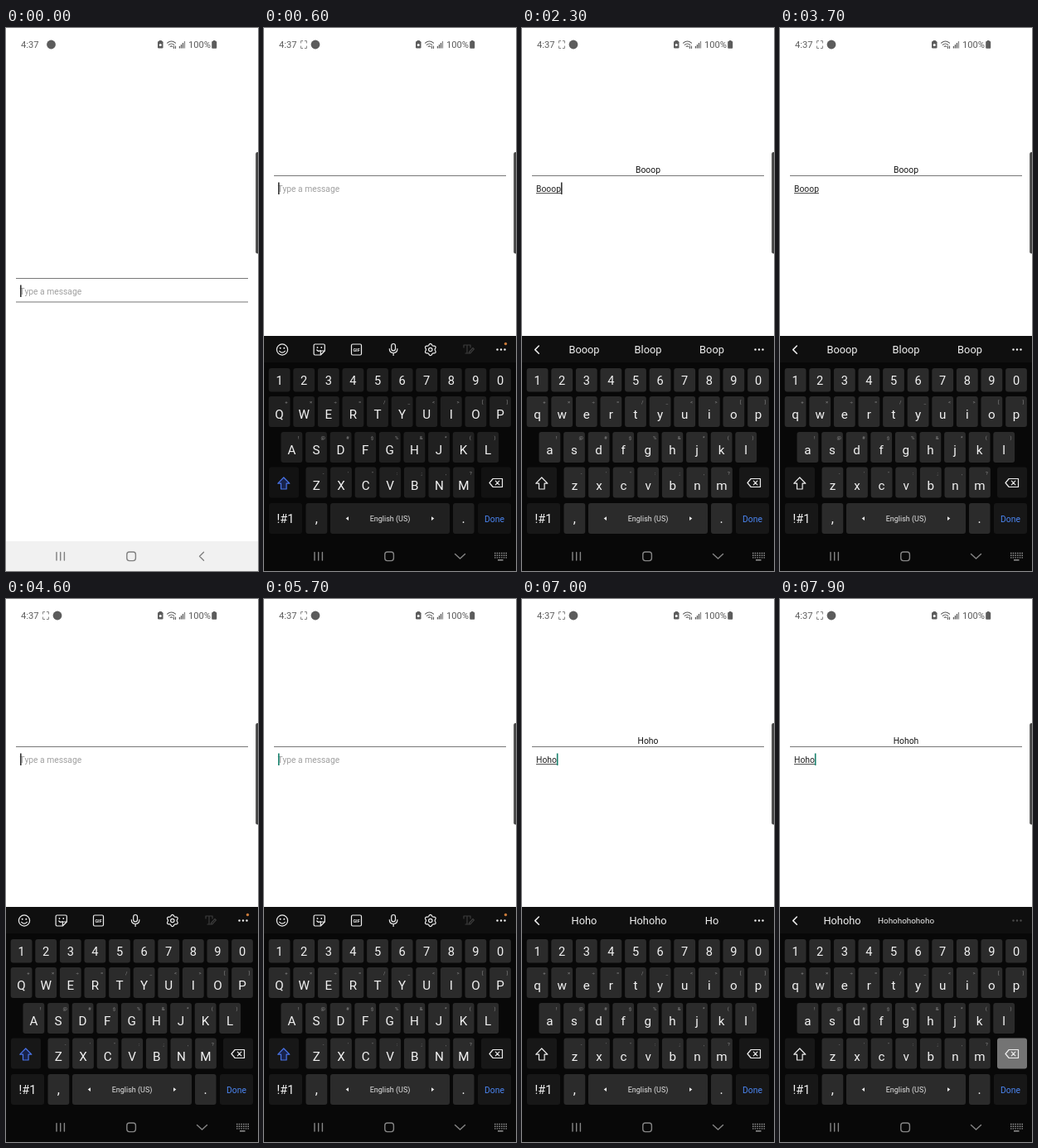
Recreate the animation shown at these times as an HTML page. Size 304 by 656 pixels, loop 8 s.

```html
<!DOCTYPE html>
<html lang="en">
<head>
<meta charset="utf-8">
<title>Message input</title>
<style>
html, body { margin: 0; width: 100%; height: 100%; overflow: hidden; background: #fff; }
svg { display: block; width: 100vw; height: 100vh; font-family: Roboto, sans-serif; }
.line { fill: none; stroke: #eee; stroke-width: 1.2; stroke-linecap: round; stroke-linejoin: round; }
.mid { text-anchor: middle; }
</style>
</head>
<body>
<svg id="stage" viewBox="0 0 304 656"></svg>
<script>
const LOOP = 8000;
const SLIDE = [150, 450];
const RESIZE = 250;
const ECHO_LAG = 60, HINT_LAG = 120;

// time, text in the field
const edits = [
  [0, ''], [RESIZE, ''],
  [1200, 'B'], [1500, 'Bo'], [1700, 'Boo'], [1900, 'Booo'], [2150, 'Booop'],
  [4000, 'Booo'], [4220, 'Boo'], [4280, 'Bo'], [4340, 'B'], [4400, ''],
  [5900, 'H'], [6200, 'Ho'], [6600, 'Hoh'], [6850, 'Hoho'], [7100, 'Hohoh'], [7350, 'Hohoho'],
  [7780, 'Hohoh'], [7880, 'Hoho']
];
const hints = {
  B: ['B', 'But', 'By'], Bo: ['Bo', 'Both', 'Boy'], Boo: ['Boo', 'Book', 'Books'],
  Booo: ['Booo', 'Boop', 'Boooo'], Booop: ['Booop', 'Bloop', 'Boop'],
  H: ['H', 'Have', 'How'], Ho: ['Ho', 'How', 'Hope'], Hoh: ['Hoh', 'Hon', 'Ho'],
  Hoho: ['Hoho', 'Hohoho', 'Ho'],
  Hohoh: ['Hohoho', 'Hohohohohoho', ''], Hohoho: ['Hohoho', 'Hohohohohoho', '']
};
const holds = [[3950, 4400], [7730, LOOP]];

const esc = s => s.replace(/&/g, '&amp;').replace(/</g, '&lt;');
const text = (x, y, size, fill, s, more = 'class="mid"') =>
  `<text x="${x}" y="${y}" font-size="${size}" fill="${fill}" ${more}>${esc(s)}</text>`;
const rect = (x, y, w, h, fill, r = 0, more = '') =>
  `<rect x="${x}" y="${y}" width="${w}" height="${h}" rx="${r}" fill="${fill}" ${more}/>`;
const path = (d, more = '') => `<path class="line" d="${d}" ${more}/>`;
const dot = (x, y, r, fill) => `<circle cx="${x}" cy="${y}" r="${r}" fill="${fill}"/>`;
const ring = (x, y, r) => `<circle class="line" cx="${x}" cy="${y}" r="${r}"/>`;
const dots = fill => [281.5, 286, 290.5].map(x => dot(x, 388.5, 1.2, fill)).join('');

function statusBar() {
  const c = '#5c5c5c';
  const bars = [0, 1, 2, 3].map(i =>
    rect(208.8 + i * 2, 22 - i * 2, 1.3, 2.5 + i * 2, i < 3 ? c : '#888')).join('');
  return text(18, 24, 11.2, c, '4:37', '') +
    `<g id="capture">${path('M44.5 18v-2.5h2.2M49.3 15.5h2.2V18M51.5 22v2.5h-2.2M46.7 24.5h-2.2V22', 'style="stroke:#888;stroke-width:1"')}</g>` +
    `<circle id="badge" cy="20" r="5.4" fill="${c}"/>` +
    rect(183, 16, 6.5, 8.5, c, 1.2) + rect(184.6, 15, 3.3, 2, c) + dot(186.25, 20.5, 1.5, '#fff') +
    path('M194.5 18.2q5-4.4 10 0M196.3 20.4q3.2-2.8 6.4 0M198.2 22.4q1.3-1 2.6 0M202.5 22v2.5M204.5 22v2.5', `style="stroke:${c};stroke-width:1.1"`) +
    bars + text(220, 24, 11.2, c, '100%', '') +
    rect(248.2, 16, 6, 8.7, c, 1) + rect(249.8, 15, 2.8, 2, c);
}

const navIcons = (color, back) =>
  `<g style="stroke:${color}">` +
  path('M61 633.5v9.5M65.7 633.5v9.5M70.4 633.5v9.5' + back, 'style="stroke:inherit;stroke-width:1.4"') +
  '<rect class="line" x="145.8" y="633" width="10.6" height="10.6" rx="3" style="stroke:inherit;stroke-width:1.4"/></g>';

const toolbar = () =>
  ring(22, 388.5, 6.6) + dot(19.7, 386.8, 1, '#eee') + dot(24.3, 386.8, 1, '#eee') + path('M18.7 390.3q3.3 3.6 6.6 0') +
  path('M61.5 382h10.4q1.4 0 1.4 1.4v6.6l-5 5h-6.8q-1.4 0-1.4-1.4v-10.2q0-1.4 1.4-1.4M73.3 390h-3.6q-1.4 0-1.4 1.4v3.6M63.8 389q2 2.4 4.4 .6') +
  dot(64.5, 386, .9, '#eee') + dot(69.3, 386, .9, '#eee') +
  '<rect class="line" x="105.5" y="382" width="12" height="13" rx="1.5"/>' + text(111.5, 390.7, 5.4, '#eee', 'GIF', 'class="mid" font-weight="700"') +
  '<rect class="line" x="153.7" y="381.5" width="4.8" height="8.4" rx="2.4"/>' + path('M151.3 387.5q0 5 4.8 5t4.8-5M156.1 392.5v3') +
  gear(200.8, 388.5) +
  `<g opacity=".2">${path('M241 386v-3h8v3M245 383v10M243 393h4M247.5 391.5l4.5-5 1.4 1.4-4.5 5h-1.4z')}</g>` +
  dots('#eee') + dot(291.5, 381.5, 1.7, '#c97a3a');

function gear(x, y) {
  let d = '';
  for (let i = 0; i <= 48; i++) {
    const a = i / 48 * Math.PI * 2, r = 6.2 + .9 * Math.cos(a * 6);
    d += (i ? 'L' : 'M') + (x + r * Math.sin(a)).toFixed(2) + ' ' + (y - r * Math.cos(a)).toFixed(2);
  }
  return path(d + 'z') + ring(x, y, 2.2);
}

function strip(word) {
  if (!word) return toolbar();
  const list = hints[word];
  return path('M20.3 384l-4.6 4.6 4.6 4.6', 'style="stroke-width:1.5"') +
    list.map((s, i) => text(75 + i * 77, s.length > 8 ? 392 : 393, s.length > 8 ? 9.9 : 12.8, '#f0f0f0', s)).join('') +
    dots(list[2] ? '#eee' : '#4a4a4a');
}

const STEP = 29.6, KEY = '#2b2b2b', SIDE = '#171717';
function keyRow(keys, marks, x0, y, h) {
  const letter = h > 30;
  return [...keys].map((k, i) => {
    const x = x0 + i * STEP;
    return rect((x - 12.9).toFixed(1), y, 25.8, h, KEY, 3, `class="key" data-key="${k}"`) +
      text(x.toFixed(1), y + (letter ? 27.2 : 19.8), letter ? 15.2 : 14.6, '#f2f2f2', k, `class="mid ${letter ? 'letter' : ''}"`) +
      (marks ? text((x + 8.3).toFixed(1), y + 9, 6, '#8c8c8c', marks[i]) : '');
  }).join('');
}

const keyboard = () =>
  rect(0, 372, 304, 290, '#080808') + rect(0, 372, 304, 32, '#0f0f0f') +
  '<g id="strip"></g>' +
  keyRow('1234567890', '', 18.6, 411, 28.5) +
  keyRow('qwertyuiop', '+×÷=/_<>[]', 18.6, 445, 37) +
  keyRow('asdfghjkl', '!@#$%&*()', 33.4, 488, 37) +
  keyRow('zxcvbnm', '-\'":;,?', 63.4, 530.5, 37) +
  rect(6, 530.5, 36, 37, SIDE, 3, 'class="key"') +
  path('M23.8 543l-7 7.2h3.7v6.8h6.6v-6.8h3.7z', 'id="shift"') +
  rect(262, 530.5, 36, 37, SIDE, 3, 'class="key" id="erase"') +
  path('M272 549.5l4.2-5h11.3v10h-11.3zM279.3 547.2l4.6 4.6M283.9 547.2l-4.6 4.6') +
  rect(6, 574, 40, 37, SIDE, 3, 'class="key"') + text(26, 598, 14.5, '#f2f2f2', '!#1') +
  rect(50.5, 574, 25.8, 37, KEY, 3, 'class="key"') + text(63.4, 598, 16, '#f2f2f2', ',') +
  rect(80, 574, 144, 37, KEY, 3, 'class="key"') + text(152, 596, 9, '#e4e4e4', 'English (US)') +
  '<path d="M102 590.3v4.6l-3.3-2.3zM202 590.3v4.6l3.3-2.3z" fill="#eee"/>' +
  rect(228, 574, 25.5, 37, KEY, 3, 'class="key"') + text(240.7, 598, 16, '#f2f2f2', '.') +
  rect(258, 574, 40, 37, SIDE, 3, 'class="key"') + text(278, 596.5, 10.4, '#4b86f2', 'Done');

const pad = () => {
  let d = '';
  for (let r = 0; r < 3; r++)
    for (let c = 0; c < 6; c++) d += `M${278 + c * 2.7} ${634.5 + r * 2.7}h1.5`;
  return path(d + 'M282 642.8h6.5', 'style="stroke:#929292;stroke-width:1.4;stroke-linecap:butt"');
};

const stage = document.getElementById('stage');
stage.innerHTML = rect(0, 0, 304, 656, '#fff') + statusBar() +
  '<g id="field">' + rect(12, 178, 280, 1, '#777') + rect(12, 206.5, 280, 1, '#777', 0, 'id="under"') +
  text(16.6, 197.7, 10.3, '#a0a0a0', 'Type a message', 'id="prompt"') +
  text(17, 197.7, 10.35, '#222', '', 'id="typed"') +
  rect(17, 199.2, 0, .9, '#333', 0, 'id="mark"') + rect(17, 186.5, 1.6, 14.5, '#333', 0, 'id="caret"') + '</g>' +
  text(152, 175, 10.35, '#111', '', 'id="echo" class="mid"') +
  rect(301.2, 150, 6, 122.5, '#454545', 2) +
  '<g id="lightNav">' + rect(0, 620, 304, 36, '#f1f1f1') + navIcons('#808080', 'M238.5 633.2l-5 5 5 5') + '</g>' +
  '<g id="board">' + keyboard() + '</g>' +
  '<g id="darkNav">' + rect(0, 620, 304, 36, '#080808') + navIcons('#858585', 'M230.5 635.5l6 5.5 6-5.5') + pad() + '</g>';

const el = {};
stage.querySelectorAll('[id]').forEach(n => el[n.id] = n);
const keys = [...stage.querySelectorAll('.key')];
const letters = [...stage.querySelectorAll('.letter')];

const clamp = v => Math.max(0, Math.min(1, v));
const show = (node, v) => node.setAttribute('opacity', +v);
const indexAt = t => {
  let i = 0;
  while (i + 1 < edits.length && edits[i + 1][0] <= t) i++;
  return i;
};
const wordAt = t => edits[indexAt(t)][1];
function setText(node, s) {
  if (node.textContent !== s) node.textContent = s;
}
function setStrip(word) {
  if (el.strip.dataset.word === word) return;
  el.strip.dataset.word = word;
  el.strip.innerHTML = strip(word);
}

function draw(t) {
  const i = indexAt(t), [since, word] = edits[i];
  const open = t >= RESIZE;

  const p = clamp((t - SLIDE[0]) / (SLIDE[1] - SLIDE[0]));
  const slide = 284 * (1 - p) ** 3;
  el.board.setAttribute('transform', `translate(0 ${slide.toFixed(2)})`);
  show(el.darkNav, p > 0);
  show(el.capture, t >= 500);
  el.badge.setAttribute('cx', t >= 500 ? 62 : 54.5);

  el.field.setAttribute('transform', `translate(0 ${open ? 0 : 124})`);
  show(el.under, !open);
  show(el.prompt, !word);
  setText(el.typed, word);
  setText(el.echo, wordAt(t - ECHO_LAG));
  const w = word ? el.typed.getComputedTextLength() : 0;
  el.mark.setAttribute('width', w);
  el.caret.setAttribute('x', 17 + w);
  el.caret.setAttribute('fill', t < 5000 ? '#333' : '#16806c');
  show(el.caret, Math.floor((t - since) / 500) % 2 === 0);

  const shown = wordAt(t - HINT_LAG);
  setStrip(shown);
  letters.forEach(n => setText(n, shown ? n.textContent.toLowerCase() : n.textContent.toUpperCase()));
  el.shift.style.stroke = shown ? '#eee' : '#4a74e8';
  el.shift.style.fill = shown ? 'none' : '#18224a';

  const fade = .7 + .3 * clamp((t - 600) / 300);
  const typing = i > 1 && word.length > edits[i - 1][1].length && t - since < 70;
  const hit = typing ? word.slice(-1).toLowerCase() : '';
  keys.forEach(k => {
    show(k, fade);
    if (k.dataset.key) k.setAttribute('fill', k.dataset.key === hit ? '#5a5a5a' : KEY);
  });
  const held = holds.some(([a, b]) => t >= a && t < b);
  el.erase.setAttribute('fill', held ? '#747474' : SIDE);
}

const start = performance.now();
function tick() {
  draw((performance.now() - start) % LOOP);
  requestAnimationFrame(tick);
}
tick();
</script>
</body>
</html>
```
